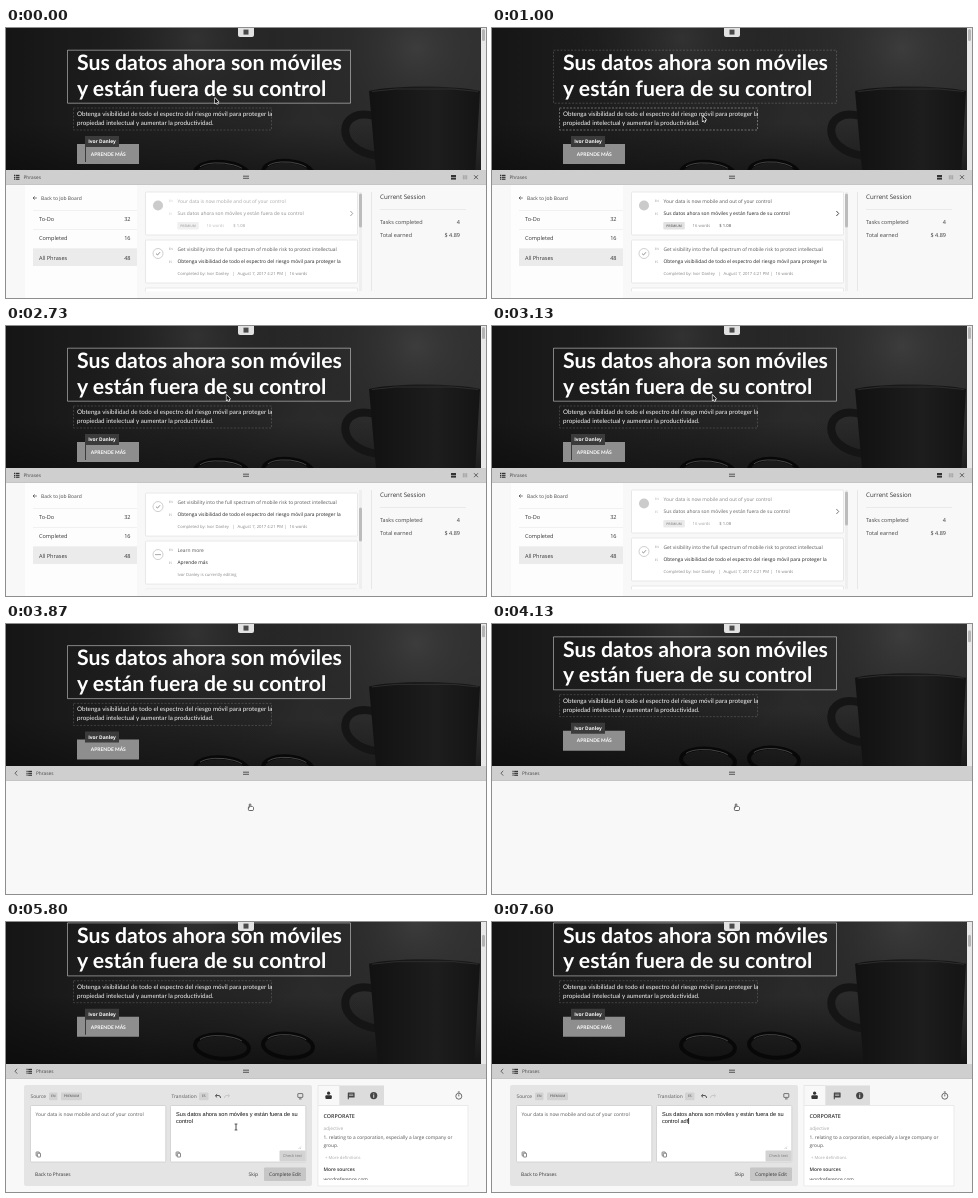
Recreate the animation shown at these times as an HTML page with a canvas. Size 480x270 px, loop 8000 ms.

```html
<!DOCTYPE html>
<html lang="en">
<head>
<meta charset="utf-8">
<style>
html, body { margin: 0; width: 100%; height: 100%; overflow: hidden; background: #f8f8f8; }
canvas { display: block; width: 480px; height: 270px; }
</style>
</head>
<body>
<canvas id="stage" width="480" height="270"></canvas>
<script>
const g = document.getElementById('stage').getContext('2d');
g.textRendering = 'geometricPrecision';
const LOOP = 8000;
const EDITOR = 'Ivor Danley';
const SANS = '"Open Sans", sans-serif', LATO = 'Lato, sans-serif', ARIAL = '"Liberation Sans", Arial, sans-serif';

const mix = (a, b, k) => a + (b - a) * k;
function ease(t, from, to) {
  const k = Math.min(1, Math.max(0, (t - from) / (to - from)));
  return k * k * (3 - 2 * k);
}
const between = (t, a, b) => t >= a && t < b;

// y is the middle of the small letters
function text(s, x, y, { size = 4.88, color = '#555', weight = 400, family = SANS, align = 'left' } = {}) {
  g.font = `${weight} ${size}px ${family}`;
  g.fillStyle = color;
  g.textAlign = align;
  g.fillText(s, x, y + size * 0.33);
}
function rect(x, y, w, h, fill, stroke, r = 0) {
  g.beginPath();
  g.roundRect(x, y, w, h, r);
  if (fill) { g.fillStyle = fill; g.fill(); }
  if (stroke) { g.strokeStyle = stroke; g.lineWidth = 0.7; g.stroke(); }
}
function line(points, color = '#444', width = 0.8) {
  g.beginPath();
  points.forEach(([x, y]) => g.lineTo(x, y));
  g.strokeStyle = color;
  g.lineWidth = width;
  g.stroke();
}
function disc(x, y, r, fill, stroke) {
  g.beginPath();
  g.arc(x, y, r, 0, 7);
  if (fill) { g.fillStyle = fill; g.fill(); }
  if (stroke) { g.strokeStyle = stroke; g.lineWidth = 0.7; g.stroke(); }
}
function within(x, y, w, h, draw) {
  g.save();
  g.beginPath();
  g.rect(x, y, w, h);
  g.clip();
  draw();
  g.restore();
}
function badge(s, x, y, w, fill = '#d2d2d2') {
  rect(x, y - 3.8, w, 7.6, fill, null, 1);
  text(s, x + w / 2, y, { size: 3.3, weight: 600, align: 'center', color: '#666' });
}
function glow(x, y, r, color) {
  const grad = g.createRadialGradient(x, y, 0, x, y, r);
  grad.addColorStop(0, color);
  grad.addColorStop(1, 'rgba(0,0,0,0)');
  g.fillStyle = grad;
  g.fillRect(0, 0, 480, 180);
}

function photo() {
  const base = g.createLinearGradient(0, 0, 480, 0);
  [[0, '#151515'], [0.3, '#222'], [0.62, '#2a2a2a'], [1, '#333']].forEach(s => base.addColorStop(...s));
  g.fillStyle = base;
  g.fillRect(0, 0, 480, 180);
  glow(190, 10, 130, 'rgba(70,70,70,.4)');
  glow(410, 20, 120, 'rgba(85,85,85,.35)');
  const desk = g.createLinearGradient(0, 95, 0, 165);
  desk.addColorStop(0, 'rgba(10,10,10,0)');
  desk.addColorStop(1, 'rgba(10,10,10,.75)');
  g.fillStyle = desk;
  g.fillRect(0, 95, 480, 85);

  // mug with its handle
  g.lineWidth = 8;
  g.strokeStyle = '#151515';
  g.beginPath();
  g.moveTo(368, 88);
  g.bezierCurveTo(332, 78, 326, 122, 372, 128);
  g.stroke();
  const mug = g.createLinearGradient(362, 0, 475, 0);
  mug.addColorStop(0, '#111');
  mug.addColorStop(0.6, '#1d1d1d');
  mug.addColorStop(1, '#141414');
  g.fillStyle = mug;
  g.beginPath();
  g.moveTo(363, 63);
  g.bezierCurveTo(385, 57, 450, 57, 474, 63);
  g.lineTo(468, 165);
  g.lineTo(372, 165);
  g.fill();
  line([[366, 63.5], [390, 61], [447, 61], [472, 63.5]], '#333', 0.8);

  // spectacles on the desk
  [[216, 146, 27], [282, 145, 25]].forEach(([x, y, rx]) => {
    g.beginPath();
    g.ellipse(x, y, rx, 12, 0.08, 0, 7);
    g.lineWidth = 4;
    g.strokeStyle = '#080808';
    g.stroke();
    g.beginPath();
    g.ellipse(x, y - 1, rx - 2, 10, 0.08, 3.6, 5.6);
    g.lineWidth = 0.8;
    g.strokeStyle = '#555';
    g.stroke();
  });
}

function outline(x, y, w, h, solid, alpha) {
  g.setLineDash(solid ? [] : [2, 1.5]);
  rect(x, y, w, h, null, `rgba(255,255,255,${alpha})`);
  g.setLineDash([]);
}

function hero(t) {
  const scroll = 21.3 * ease(t, 3800, 4520);
  within(0, 0, 480, 142, () => {
    g.save();
    g.translate(0, -scroll);
    photo();
    const onTitle = t < 1000 || t >= 2400;
    const onBody = between(t, 1060, 2400);
    outline(61.5, 22.2, 283, 53, onTitle, onTitle ? 0.65 : 0.25);
    outline(67.5, 80, 198, 22, onBody, onBody ? 0.7 : between(t, 330, 1060) ? 0.5 : 0.22);
    const title = { size: 21.25, weight: 700, family: LATO, color: '#fff' };
    text('Sus datos ahora son móviles', 71, 35, title);
    text('y están fuera de su control', 71, 60.5, title);
    const body = { size: 6.24, family: LATO, color: '#f4f4f4' };
    text('Obtenga visibilidad de todo el espectro del riesgo móvil para proteger la', 71, 86, body);
    text('propiedad intelectual y aumentar la productividad.', 71, 95, body);
    rect(71, 116, 62, 20, '#8e8e8e');
    text('APRENDE MÁS', 102.3, 126.2, { size: 4.97, weight: 700, family: LATO, color: '#fff', align: 'center' });
    if (t < 400 || between(t, 1930, 3600) || between(t, 5270, 7330)) rect(79, 118, 0.9, 16, '#333');
    rect(79, 108, 34, 11, '#3b3b3b');
    text(EDITOR, 96, 113.8, { weight: 700, color: '#fff', align: 'center' });
    g.restore();
    rect(475, 0, 5, 142, '#e9e9e9');
    rect(476, 1 + scroll * 0.55, 3, 12, '#b4b4b4', null, 1.5);
  });
  rect(232, -3, 16, 12, '#e2e2e2', null, 2);
  rect(237.5, 1.6, 5, 5, '#4a4a4a');
}

function bar(editing) {
  rect(0, 142, 480, 15, '#cfcfcf');
  rect(0, 156.5, 480, 0.5, '#bbb');
  const x = editing ? 20.5 : 8;
  if (editing) line([[11.2, 146.8], [9, 149.2], [11.2, 151.6]]);
  for (let i = 0; i < 3; i++) {
    rect(x, 146.8 + i * 1.9, 1.1, 1.2, '#333');
    rect(x + 1.7, 146.8 + i * 1.9, 3.8, 1.2, '#333');
  }
  text('Phrases', editing ? 30 : 17.5, 149.2, { size: 4.75, color: '#444' });
  rect(237, 147.7, 6, 0.9, '#444');
  rect(237, 149.8, 6, 0.9, '#444');
  if (editing) return;
  rect(445, 147, 5, 2, '#333');
  rect(445, 149.6, 5, 2, '#333');
  rect(456.8, 147.2, 1.9, 4.2, '#aaa');
  rect(459.3, 147.2, 1.9, 4.2, '#aaa');
  line([[468, 147.2], [472, 151.2]]);
  line([[472, 147.2], [468, 151.2]]);
}

const CARDS = [
  ['Your data is now mobile and out of your control', 'Sus datos ahora son móviles y están fuera de su control'],
  ['Get visibility into the full spectrum of mobile risk to protect intellectual',
   'Obtenga visibilidad de todo el espectro del riesgo móvil para proteger la'],
  ['Learn more', 'Aprende más'],
  ['Contact us', 'Contáctenos']
];

function card(i, y, alpha) {
  rect(139.5, y, 212, 43, '#fff', '#e0e0e0', 1);
  if (i === 0) disc(152, y + 13.5, 5, '#cbcbcb');
  else disc(152, y + 13.5, 5, '#fff', '#bbb');
  if (i === 1) line([[150, y + 13.6], [151.5, y + 15], [154, y + 12.2]], '#666', 0.7);
  if (i === 2) [-2, 0, 2].forEach(d => disc(152 + d, y + 13.5, 0.6, '#555'));
  g.save();
  g.globalAlpha = alpha;
  const small = { size: 4.2, color: '#888' }, code = { size: 3.1, color: '#999' };
  text('EN', 162.8, y + 9.3, code);
  text('ES', 162.8, y + 21.6, code);
  text(CARDS[i][0], 171.5, y + 9.3);
  text(CARDS[i][1], 171.5, y + 21.6, { color: '#222' });
  if (i === 0) {
    badge('PREMIUM', 171.3, y + 33.8, 21.5, '#e2e2e2');
    text('16 words', 200.5, y + 33.5, small);
    text('$ 1.08', 227.3, y + 33.5, { size: 4.2, color: '#444' });
    line([[344.4, y + 19], [346.7, y + 21.5], [344.4, y + 24]], '#333', 0.9);
  } else if (i === 1) {
    text('Completed by: ' + EDITOR, 171.5, y + 33.5, small);
    text('|', 226.3, y + 33.5, small);
    text('August 7, 2017 4:21 PM', 231.5, y + 33.5, small);
    text('|', 278.3, y + 33.5, small);
    text('16 words', 283.5, y + 33.5, small);
  } else if (i === 2) {
    text(EDITOR + ' is currently editing', 171.5, y + 33.5, small);
  }
  g.restore();
}

function phraseList(t) {
  rect(19, 157, 112, 113, '#fdfdfd');
  line([[30.8, 170], [27, 170]], '#444', 0.7);
  line([[28.7, 168.4], [27, 170], [28.7, 171.6]], '#444', 0.7);
  text('Back to Job Board', 35, 170.2, { size: 4.95, color: '#444' });
  rect(27, 221, 104, 17, '#ebebeb');
  [182, 201.5, 220.5].forEach(y => rect(27, y, 104, 0.5, '#e6e6e6'));
  [['To-Do', 32], ['Completed', 16], ['All Phrases', 48]].forEach(([name, count], i) => {
    const y = 191.3 + i * 19.2;
    text(name, 33, y, { size: 5.55, color: '#333' });
    text(count, 124.5, y, { size: 5.55, color: '#333', align: 'right' });
  });

  const k = ease(t, 1060, 1700) - ease(t, 2660, 3120);
  const first = t < 1000 ? mix(0.5, 1, ease(t, 70, 530)) : between(t, 2660, 3470) ? mix(0.5, 1, ease(t, 2900, 3400)) : 1;
  const second = between(t, 1300, 2130) ? mix(0.55, 1, ease(t, 1800, 2130)) : 1;
  within(138, 163, 220, 100.5, () => {
    CARDS.forEach((_, i) => card(i, 164 + 48 * (i - k), [first, second, 1, 1][i]));
    rect(353, 164, 3, 99, '#efefef');
    rect(353, 165.5 + 17 * k, 3, 34, '#bcbcbc', null, 1.5);
  });

  rect(365, 164, 0.6, 99, '#dcdcdc');
  text('Current Session', 374, 169, { size: 6.2, color: '#333' });
  rect(374, 181, 86, 0.5, '#ddd');
  [['Tasks completed', '4'], ['Total earned', '$ 4.89']].forEach(([name, value], i) => {
    text(name, 374, 194 + i * 13.5, { size: 5.5, color: '#444' });
    text(value, 454, 194 + i * 13.5, { size: 5.5, color: '#333', align: 'right' });
  });
}

function copyIcon(x, y) {
  rect(x, y, 3.2, 3.8, '#fff', '#555', 0.4);
  rect(x + 1.2, y + 1.2, 3.2, 3.8, '#fff', '#555', 0.4);
}
function arrowBack(x, y, dir, color) {
  line([[x + dir * 2.6, y + 1.6], [x + dir * 2, y - 0.4], [x, y - 1], [x - dir * 2.4, y - 0.6]], color, 0.9);
  line([[x - dir * 0.9, y - 2.2], [x - dir * 2.6, y - 0.6], [x - dir * 0.9, y + 1]], color, 0.9);
}

function editor(t) {
  g.save();
  g.globalAlpha = ease(t, 4160, 4330);
  rect(18, 163, 288, 101, '#e4e4e4', null, 2);
  text('Source', 24.5, 174.4);
  badge('EN', 43, 174.4, 8.5);
  badge('PREMIUM', 55, 174.4, 21);
  text('Translation', 165.5, 174.4);
  badge('ES', 193, 174.4, 9.5);
  arrowBack(212, 174.4, 1, '#444');
  arrowBack(221, 174.4, -1, '#c4c4c4');
  rect(291.8, 171.6, 5, 3.8, null, '#444', 0.4);
  rect(293, 176.5, 2.6, 0.8, '#444');
  [24.5, 164.5].forEach(x => {
    rect(x, 183.5, 135.3, 56.5, '#fff', '#c9c9c9', 1);
    copyIcon(x + 5.6, 230);
  });
  text('Your data is now mobile and out of your control', 29.5, 192.2);

  const typed = [6870, 7070, 7300, 7600].filter(at => t >= at).length;
  const last = 'control' + ' adf'.slice(0, typed);
  const area = { size: 5.64, family: ARIAL, color: '#111' };
  text('Sus datos ahora son móviles y están fuera de su', 170, 192.4, area);
  text(last, 170, 199, area);
  if (between(t, 5270, 5770) || t >= 6330) rect(170 + g.measureText(last).width, 196, 0.8, 6, '#111');

  line([[292.5, 227], [295, 224.5]], '#aaa', 0.5);
  line([[294, 227], [295, 226]], '#aaa', 0.5);
  rect(273.5, 228.5, 26, 11, '#d3d3d3', null, 1);
  text('Check text', 286.5, 234.1, { size: 3.9, color: '#777', align: 'center' });
  text('Back to Phrases', 29, 252.4, { size: 4.85, color: '#333' });
  text('Skip', 242.5, 252.4, { color: '#333' });
  rect(258, 245.5, 42, 13.5, '#c6c6c6', null, 1);
  text('Complete Edit', 279, 252.4, { color: '#333', align: 'center' });

  // dictionary
  rect(312, 163.5, 66, 20, '#dcdcdc');
  rect(312, 163.5, 21.5, 20, '#f8f8f8', '#e2e2e2');
  rect(312, 183.5, 150, 80.5, '#fff', '#e4e4e4');
  disc(322.6, 171.2, 1.6, '#333');
  rect(319.4, 173.2, 6.4, 3.8, '#333', null, 1);
  rect(341.8, 170.4, 6.8, 5, '#444', null, 0.5);
  line([[342.3, 174.5], [342.3, 177.3]], '#444', 1);
  rect(343.1, 171.8, 4.2, 0.6, '#ddd');
  rect(343.1, 173.3, 4.2, 0.6, '#ddd');
  disc(367.7, 173.6, 3.6, '#444');
  rect(367.3, 171.6, 0.9, 0.9, '#eee');
  rect(367.3, 173.1, 0.9, 2.6, '#eee');
  disc(452.8, 174.2, 3, null, '#333');
  rect(451.8, 169.6, 2, 0.8, '#333');
  line([[452.8, 172.3], [452.8, 174.4]], '#333', 0.7);
  text('CORPORATE', 317.5, 194, { size: 5.4, weight: 600, color: '#333' });
  text('adjective', 317.5, 206, { size: 4.75, color: '#aaa' });
  text('1. relating to a corporation, especially a large company or', 317.5, 215, { size: 4.85 });
  text('group.', 317.5, 223.5, { size: 4.85 });
  text('+ More definitions', 319, 235.3, { size: 4.2, color: '#aaa' });
  text('More sources', 317.5, 247.2, { size: 4.85, weight: 600, color: '#333' });
  within(312, 250, 149, 8, () => text('wordreference.com', 317.5, 257.2, { color: '#444' }));
  g.restore();
}

// time span and end point of each pointer move
const MOVES = [[70, 530, 210.5, 88], [2270, 2530, 220.5, 69], [3530, 3800, 244, 180.3], [4670, 5000, 229, 205], [5730, 5800, 230, 205]];

function shape(points, x, y, scale = 1) {
  g.beginPath();
  points.forEach(([px, py]) => g.lineTo(x + px * scale, y + py * scale));
  g.closePath();
  g.lineJoin = 'round';
  g.lineWidth = 1.2;
  g.strokeStyle = '#fff';
  g.stroke();
  g.fillStyle = '#111';
  g.fill();
}
function pointer(t) {
  if (t >= 6870) return;
  let x = 209, y = 70;
  for (const [from, to, px, py] of MOVES) {
    const k = ease(t, from, to);
    x = mix(x, px, k);
    y = mix(y, py, k);
  }
  if (t >= 4930) {
    line([[x - 1.4, y - 3], [x + 1.4, y - 3]], '#222', 0.7);
    line([[x, y - 3], [x, y + 3]], '#222', 0.8);
    line([[x - 1.4, y + 3], [x + 1.4, y + 3]], '#222', 0.7);
  } else if (between(t, 3730, 4400)) {
    rect(x - 1.6, y + 2.4, 5, 3.8, '#fff', '#222', 1);
    rect(x - 0.7, y - 0.4, 1.5, 4, '#fff', '#222', 0.7);
    rect(x - 0.3, y + 2.6, 3.2, 2.4, '#fff');
  } else {
    shape([[0, 0], [0, 5.4], [1.2, 4.3], [2, 6], [2.9, 5.6], [2.1, 4], [3.7, 3.9]], x, y);
  }
}

function draw(t) {
  const editing = t >= 3860;
  rect(0, 0, 480, 270, '#f8f8f8');
  hero(t);
  if (editing) editor(t);
  else phraseList(t);
  bar(editing);
  pointer(t);
}

const start = performance.now();
function tick() {
  draw((performance.now() - start) % LOOP);
  requestAnimationFrame(tick);
}
tick();
</script>
</body>
</html>
```
